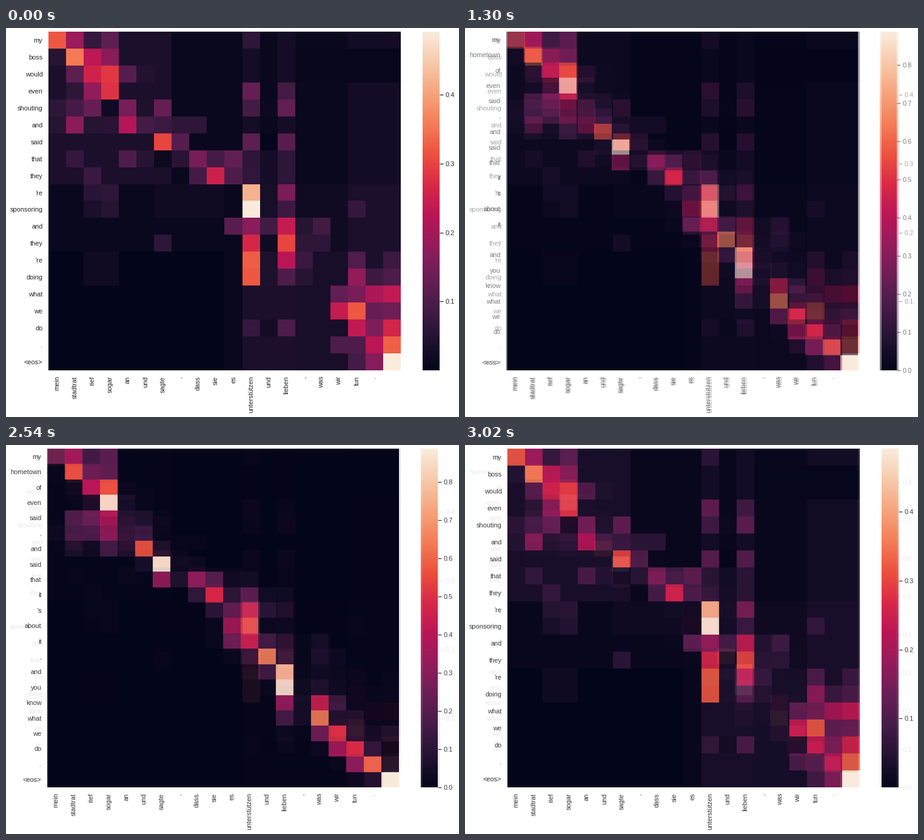
These frames come from a looping animation (747x642 px, 3080 ms). A matplotlib script:

```python
import matplotlib.pyplot as plt
import numpy as np
from matplotlib.animation import FuncAnimation
from matplotlib.colors import LinearSegmentedColormap

W, H, DPI = 747, 642, 100
TOP, BOTTOM = 6, 565
COLS = 20
INK = "#262626"
STEP = 20             # ms per frame
HOLD, FADE = 1000, 60  # ms a map rests, ms per fade step
HALF = HOLD + 9 * FADE

plt.rcParams["font.family"] = "Liberation Sans"
plt.rcParams["font.size"] = 11 * 72 / DPI

ROCKET = LinearSegmentedColormap.from_list("warm", [
    "#03051a", "#221331", "#451c47", "#691f55", "#921c5b", "#b91657",
    "#d92847", "#ed503e", "#f47d57", "#f6a47c", "#f7c9aa", "#faebdd"])

GERMAN = ("mein stadtrat rief sogar an und sagte , dass sie es unterstützen "
          "und lieben , was wir tun .").split()

# Each row: word, then runs of weights keyed by their first column.
SOFT = [
    ("my", {0: (.32, .19, .07, .12), 11: (.06,)}),
    ("boss", {0: (.05, .355, .23, .17)}),
    ("would", {1: (.12, .255, .285, .11, .045)}),
    ("even", {1: (.06, .18, .28), 11: (.13, .01, .09)}),
    ("shouting", {0: (.06, .09, .13, .02, .15, .04, .13),
                  11: (.09, .015, .125)}),
    ("and", {0: (.05, .17, .05, .055, .22, .09, .08, .06, .06)}),
    ("said", {6: (.30, .11), 11: (.12, .005, .115)}),
    ("that", {1: (.07,), 4: (.10, .05, .015, .055, .15, .09, .125, .06)}),
    ("they", {2: (.075,), 8: (.09, .25, .10, .065)}),
    ("'re", {2: (.055, .06), 11: (.42, .03, .155)}),
    ("sponsoring", {2: (.035, .05), 11: (.49, .03, .08), 17: (.07,)}),
    ("and", {10: (.115, .17, .085, .24, .05, .085)}),
    ("they", {6: (.06,), 11: (.265, .02, .30, .06, .06)}),
    ("'re", {11: (.325, .04, .225, .075), 17: (.105, .035, .08)}),
    ("doing", {11: (.32, .04, .10, .05), 17: (.18, .08, .10)}),
    ("what", {16: (.125, .15, .21, .235)}),
    ("we", {16: (.24, .32, .13, .14)}),
    ("do", {11: (.07, .025, .10), 17: (.235, .16, .26)}),
    (".", {16: (.10, .10, .225, .33)}),
    ("<eos>", {17: (.09, .165, .49)}),
]

# Faint areas: first row, last row, first column, last column, weight.
SOFT_HAZE = [
    (0, 9, 0, 7, .035), (0, 20, 11, 14, .027), (0, 7, 12, 13, .01),
    (7, 9, 13, 14, .06), (0, 20, 17, 20, .025), (1, 3, 14, 20, .006),
    (9, 11, 6, 10, .02), (9, 13, 14, 17, .02), (9, 13, 17, 20, .035),
    (13, 20, 0, 10, .001), (13, 15, 2, 4, .02), (13, 20, 14, 17, .032),
    (15, 20, 11, 14, .035),
]

SHARP = [
    ("my", {0: (.22, .36, .16, .21)}),
    ("hometown", {0: (.01, .55, .23, .21)}),
    ("of", {1: (.02, .40, .57)}),
    ("even", {2: (.04, .87, .05, .01)}),
    ("said", {1: (.19, .24, .38, .08, .07, .01)}),
    (",", {0: (.02, .16, .18, .33, .10, .14)}),
    ("and", {1: (.06, .03, .16, .07, .57, .06)}),
    ("said", {5: (.05, .87, .02, .03)}),
    ("that", {6: (.33, .07, .32, .20, .02, .035)}),
    ("it", {8: (.11, .48, .10, .22, .04, .03)}),
    ("'s", {9: (.11, .24, .43, .10, .05)}),
    ("about", {9: (.02, .37, .53, .02, .02)}),
    ("it", {9: (.02, .25, .45, .15, .07, .005, .04)}),
    (",", {10: (.02, .11, .65, .11, .005, .06, .03)}),
    ("and", {11: (.025, .15, .77, .01, .03, .02)}),
    ("you", {12: (.015, .86, .03, .07, .03)}),
    ("know", {13: (.33, .05, .45, .14)}),
    ("what", {13: (.16, .05, .64, .06, .06)}),
    ("we", {13: (.02, .005, .26, .50, .08, .03, .06)}),
    ("do", {15: (.02, .37, .49, .10)}),
    (".", {16: (.005, .32, .61, .05)}),
    ("<eos>", {17: (.015, .06, .88)}),
]


def weights(rows, base, haze=()):
    grid = np.full((len(rows), COLS), base)
    for r0, r1, c0, c1, v in haze:
        grid[r0:r1, c0:c1] = v
    for r, (_, runs) in enumerate(rows):
        for c, vals in runs.items():
            grid[r, c:c + len(vals)] = vals
    return grid


def paint(grid, left, right, bar, vmax):
    """Heatmap and colour bar on a white stage."""
    stage = np.ones((H, W, 3))
    y = (np.arange(TOP, BOTTOM) + .5 - TOP) / (BOTTOM - TOP)
    x = (np.arange(left, right) + .5 - left) / (right - left)
    cells = grid[np.ix_((y * len(grid)).astype(int), (x * COLS).astype(int))]
    stage[TOP:BOTTOM, left:right] = ROCKET(cells / vmax)[..., :3]
    stage[TOP:BOTTOM, bar:bar + 28] = ROCKET(1 - y)[:, None, :3]
    return stage


def annotate(rows, left, right, bar, vmax, ticks):
    """Labels and tick marks, returned so they can be faded."""
    items = []
    dy = (BOTTOM - TOP) / len(rows)
    dx = (right - left) / COLS
    for i, (word, _) in enumerate(rows):
        items.append(ax.text(left - 9.5, TOP + (i + .5) * dy, word, color=INK,
                             ha="right", va="center_baseline"))
    for i, word in enumerate(GERMAN):
        items.append(ax.text(left + (i + .5) * dx, BOTTOM + 9.5, word,
                             color=INK, rotation=90, ha="center", va="top"))
    for v in ticks:
        y = BOTTOM - v / vmax * (BOTTOM - TOP)
        items += ax.plot([bar + 28, bar + 34], [y, y], color=INK,
                         lw=1.25 * 72 / DPI, solid_capstyle="butt")
        items.append(ax.text(bar + 37.5, y, f"{v:.1f}", color=INK,
                             ha="left", va="center_baseline"))
    return items


fig = plt.figure(figsize=(W / DPI, H / DPI), dpi=DPI, facecolor="white")
ax = fig.add_axes([0, 0, 1, 1])
ax.axis("off")

soft_box = (70, 651, 687, .4918)
sharp_box = (68, 648, 684, .8865)
soft = paint(weights(SOFT, .01, SOFT_HAZE), *soft_box)
sharp = paint(weights(SHARP, .003), *sharp_box)
picture = ax.imshow(soft, extent=(0, W, H, 0), aspect="auto",
                    interpolation="nearest")
soft_text = annotate(SOFT, *soft_box, np.arange(1, 5) / 10)
sharp_text = annotate(SHARP, *sharp_box, np.arange(9) / 10)
ax.set_xlim(0, W)
ax.set_ylim(H, 0)


def fade(items, alpha):
    for item in items:
        item.set_visible(alpha > 0)
        item.set_alpha(alpha)


def update(n):
    half, t = divmod(n * STEP, HALF)
    mix = 0 if t < HOLD else ((t - HOLD) // FADE + 1) / 10
    if half:
        mix = 1 - mix
    picture.set_data((1 - mix) * soft + mix * sharp)
    fade(soft_text, 1 - mix)
    fade(sharp_text, mix)
    return [picture, *soft_text, *sharp_text]


anim = FuncAnimation(fig, update, frames=2 * HALF // STEP, interval=STEP,
                     repeat=True, repeat_delay=0, blit=False)
plt.show()
```
